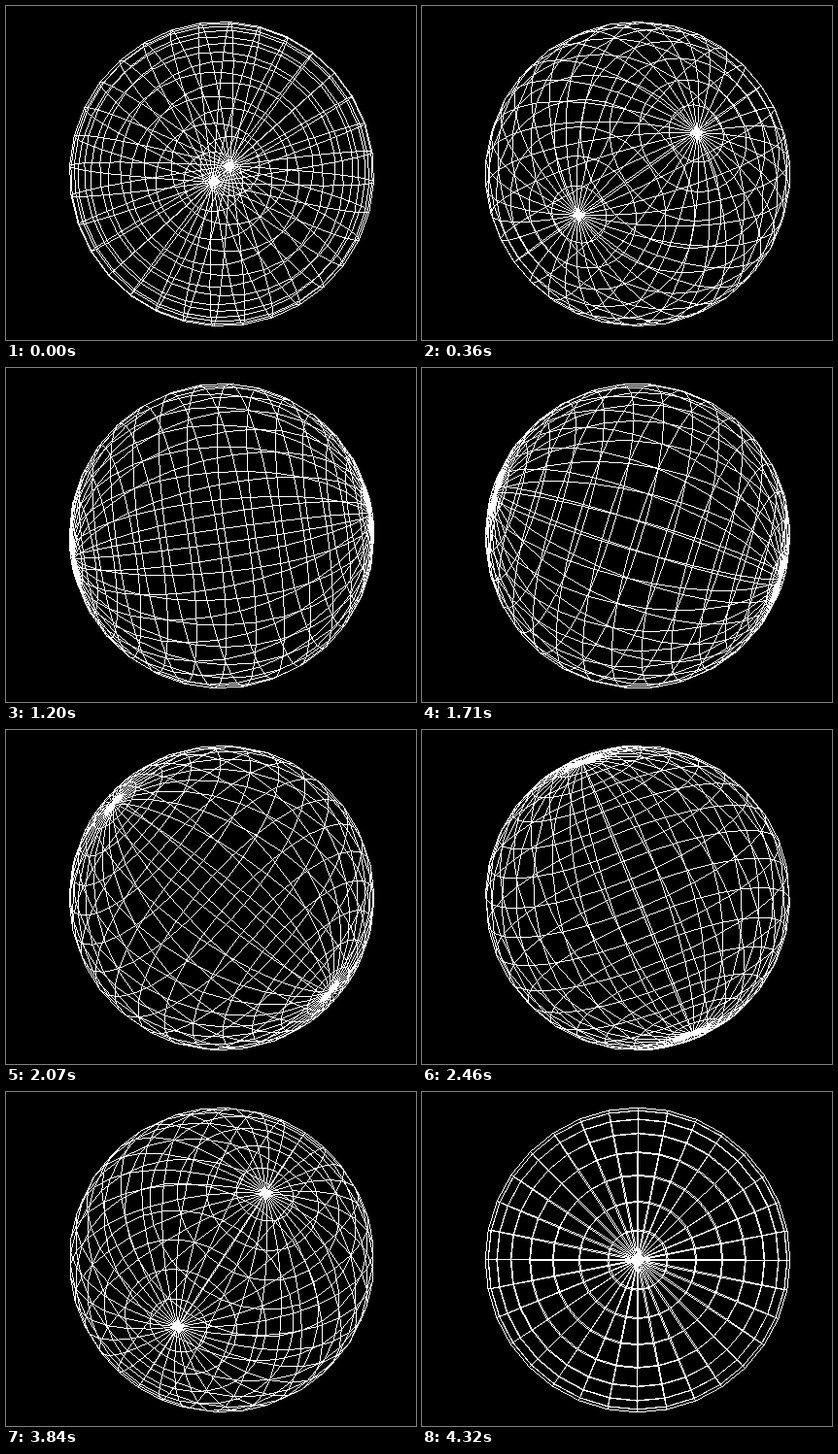
Recreate the animation shown at these times as an HTML page with a canvas. Size 422x344 px, loop 4.35 s.

```html
<!DOCTYPE html>
<html lang="en">
<head>
<meta charset="utf-8">
<title>Turning wire sphere</title>
<style>
  html, body { margin: 0; width: 100%; height: 100%; overflow: hidden; background: #000; }
  canvas { display: block; width: 422px; height: 344px; image-rendering: pixelated; }
</style>
</head>
<body>
<canvas id="stage" width="422" height="344"></canvas>
<script>
const W = 422, H = 344, CX = 222, CY = 173, R = 156.9;
const SLICES = 32, STACKS = 16;
const STEP = 30, STEPS = 145;
const FIRST_TURN = 5.4, TURN_PER_STEP = 2.465; // degrees around the axis (1, 1, 1)
const BLACK = 0xff000000, WHITE = 0xffffffff;

const ctx = document.getElementById('stage').getContext('2d');
const image = ctx.createImageData(W, H);
const pixels = new Uint32Array(image.data.buffer);

// Hard-edged line, one pixel per step of the longer axis
function line([x0, y0], [x1, y1]) {
  const dx = x1 - x0, dy = y1 - y0;
  const steep = Math.abs(dy) > Math.abs(dx);
  let [m0, n0, m1, n1] = steep ? [y0, x0, y1, x1] : [x0, y0, x1, y1];
  if (m0 > m1) [m0, n0, m1, n1] = [m1, n1, m0, n0];
  const slope = m1 > m0 ? (n1 - n0) / (m1 - m0) : 0;
  for (let m = Math.floor(m0); m <= Math.floor(m1); m++) {
    const at = Math.min(Math.max(m + 0.5, m0), m1);
    const n = Math.floor(n0 + (at - m0) * slope);
    pixels[steep ? m * W + n : n * W + m] = WHITE;
  }
}

function draw(step) {
  const t = (FIRST_TURN + TURN_PER_STEP * step) * Math.PI / 180;
  const c = Math.cos(t), s = Math.sin(t) / Math.sqrt(3);
  const a = (1 + 2 * c) / 3, b = (1 - c) / 3 - s, d = (1 - c) / 3 + s;

  const vertex = (stack, slice) => {
    const lat = stack * Math.PI / STACKS, lon = slice * 2 * Math.PI / SLICES;
    const x = Math.sin(lat) * Math.cos(lon), y = Math.sin(lat) * Math.sin(lon), z = Math.cos(lat);
    return [CX + R * (a * x + b * y + d * z), CY + R * (d * x + a * y + b * z)];
  };

  pixels.fill(BLACK);
  for (let i = 0; i < STACKS; i++) {
    for (let j = 0; j < SLICES; j++) {
      const p = vertex(i, j);
      line(p, vertex(i + 1, j));
      if (i > 0) line(p, vertex(i, j + 1));
    }
  }
  ctx.putImageData(image, 0, 0);
}

const start = performance.now();
let shown = -1;

function tick() {
  const step = Math.floor((performance.now() - start) / STEP) % STEPS;
  if (step !== shown) draw(shown = step);
  requestAnimationFrame(tick);
}
tick();
</script>
</body>
</html>
```
